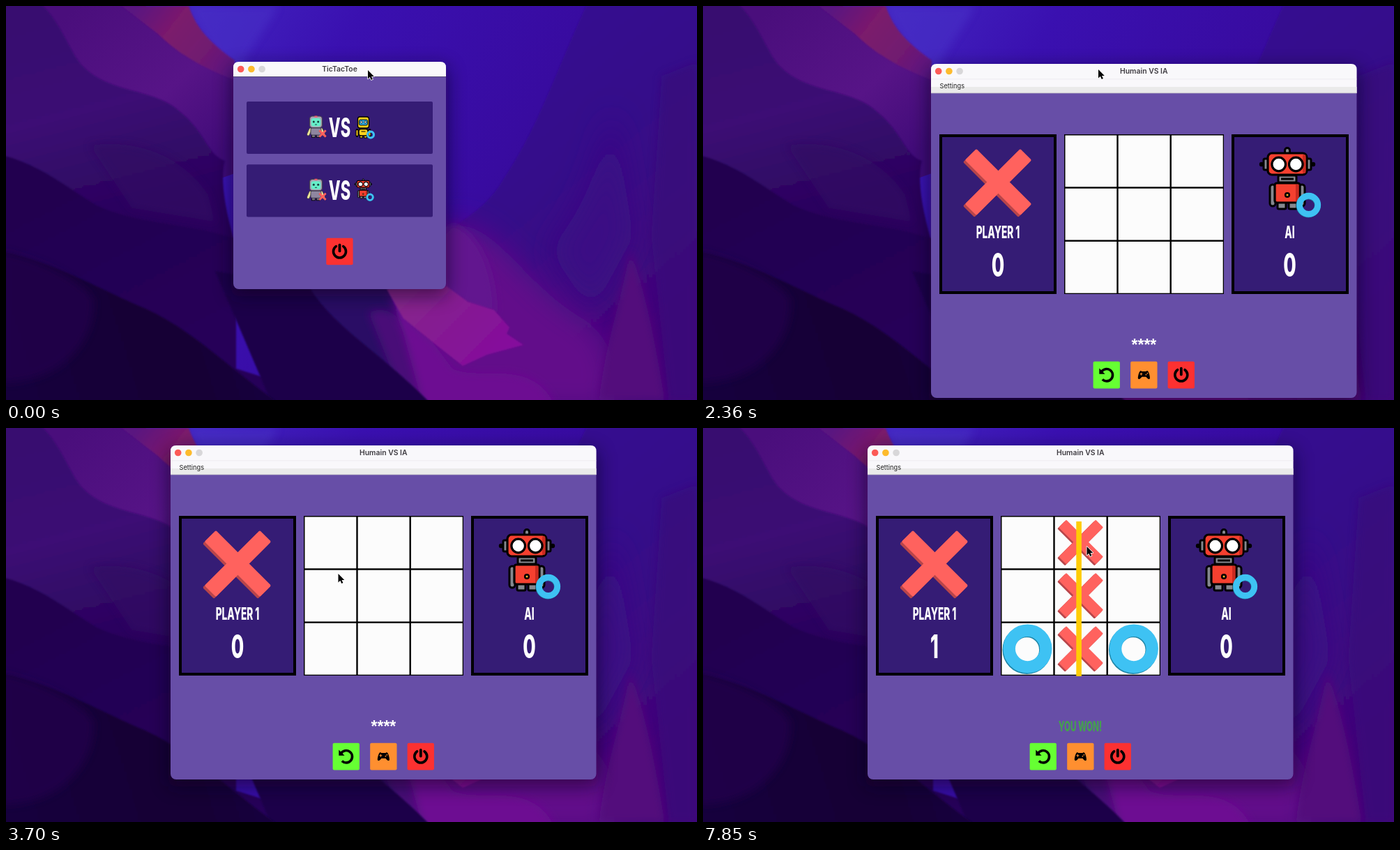
These frames come from a looping animation (991x565 px, 8000 ms). An HTML page:

```html
<!DOCTYPE html>
<html lang="en">
<head>
<meta charset="utf-8">
<title>TicTacToe</title>
<style>
html, body { margin: 0; width: 100%; height: 100%; overflow: hidden; background: #210450; }
svg { display: block; width: 991px; height: 565px; }
text { font-family: Inter, Roboto, sans-serif; }
.title { font-size: 10.4px; font-weight: 600; fill: #3f3c42; text-anchor: middle; }
.menu { font-size: 9.2px; fill: #222; }
.cond { font-weight: 800; fill: #fff; text-anchor: middle; }
.stars { font: bold 23px "Liberation Sans", Arial, sans-serif; fill: #fff; text-anchor: middle; }
</style>
</head>
<body>
<svg id="stage" viewBox="0 0 991 565" xmlns="http://www.w3.org/2000/svg">
<defs>
  <linearGradient id="sky" gradientUnits="userSpaceOnUse" x1="280" y1="0" x2="960" y2="420">
    <stop offset="0" stop-color="#4224c0"/><stop offset=".25" stop-color="#3a10b0"/>
    <stop offset=".6" stop-color="#380ba0"/><stop offset="1" stop-color="#350880"/>
  </linearGradient>
  <linearGradient id="fold" x1="0" y1="0" x2=".5" y2="1">
    <stop offset="0" stop-color="#350c94"/><stop offset=".5" stop-color="#35098a"/>
    <stop offset="1" stop-color="#430678"/>
  </linearGradient>
  <linearGradient id="plum" gradientUnits="userSpaceOnUse" x1="100" y1="0" x2="300" y2="220">
    <stop offset="0" stop-color="#4a0e7c"/><stop offset=".6" stop-color="#571487"/>
    <stop offset="1" stop-color="#400b78"/>
  </linearGradient>
  <linearGradient id="crimson" gradientUnits="userSpaceOnUse" x1="190" y1="0" x2="320" y2="100">
    <stop offset="0" stop-color="#5a1280"/><stop offset=".35" stop-color="#7b1a6c"/>
    <stop offset=".7" stop-color="#711a70"/><stop offset="1" stop-color="#5c1684"/>
  </linearGradient>
  <linearGradient id="hill" gradientUnits="userSpaceOnUse" x1="60" y1="0" x2="140" y2="310">
    <stop offset="0" stop-color="#370a70"/><stop offset=".5" stop-color="#3c0a74"/>
    <stop offset="1" stop-color="#29055c"/>
  </linearGradient>
  <linearGradient id="deep" gradientUnits="userSpaceOnUse" x1="60" y1="230" x2="200" y2="500">
    <stop offset="0" stop-color="#22044f"/><stop offset="1" stop-color="#260658"/>
  </linearGradient>
  <linearGradient id="floor" gradientUnits="userSpaceOnUse" x1="40" y1="560" x2="460" y2="430">
    <stop offset="0" stop-color="#19033c"/><stop offset=".5" stop-color="#150234"/>
    <stop offset="1" stop-color="#1d0548"/>
  </linearGradient>
  <linearGradient id="rose" gradientUnits="userSpaceOnUse" x1="590" y1="400" x2="700" y2="510">
    <stop offset="0" stop-color="#86268c"/><stop offset="1" stop-color="#850c9c"/>
  </linearGradient>
  <filter id="b1" x="-10%" y="-10%" width="120%" height="120%"><feGaussianBlur stdDeviation="1"/></filter>
  <filter id="b6" x="-20%" y="-20%" width="140%" height="140%"><feGaussianBlur stdDeviation="6"/></filter>
  <filter id="b20" x="-40%" y="-40%" width="180%" height="180%"><feGaussianBlur stdDeviation="20"/></filter>
  <filter id="shade" x="-20%" y="-20%" width="140%" height="150%"><feGaussianBlur stdDeviation="13"/></filter>
</defs>

<g id="wallpaper">
  <rect width="991" height="565" fill="url(#sky)"/>
  <path d="M262 0H390C370 40 345 60 330 110L295 60Z" fill="#4a30c8" opacity=".55" filter="url(#b6)"/>
  <path d="M832 0C790 90 765 170 716 244C690 290 662 300 640 320L700 565H991V0Z" fill="url(#fold)" filter="url(#b1)"/>
  <path d="M870 150C850 230 830 290 780 350L840 440L900 330Z" fill="#3a0a84" filter="url(#b20)"/>
  <path d="M940 100L925 330L950 565H991V80Z" fill="#39077a" opacity=".7" filter="url(#b6)"/>
  <path d="M630 315C700 300 740 400 830 450C870 480 880 520 870 580H580L540 400Z" fill="#620b8a" filter="url(#b20)"/>
  <path d="M895 350C915 400 930 470 945 565H850C860 480 880 430 895 350Z" fill="#52077c" filter="url(#b6)"/>
  <path d="M640 312C675 325 700 370 702 440L640 420L560 406Z" fill="#62178f" filter="url(#b6)"/>
  <path d="M400 400H546C556 430 590 500 607 565H380Z" fill="#2a0765" filter="url(#b1)"/>
  <path d="M520 440C560 420 590 470 612 565H570Z" fill="#480a78" filter="url(#b6)"/>
  <path d="M546 405C560 430 585 462 610 480L640 520C680 540 760 500 790 580H600L570 470Z" fill="#6d0c92" filter="url(#b6)"/>
  <path d="M546 406L632 402L662 424L700 436L722 461L718 470L742 486L690 500L655 516L612 482L570 448Z" fill="url(#rose)" filter="url(#b1)"/>

  <path d="M40 0H200L328 98V240L300 250L100 150Z" fill="url(#plum)"/>
  <path d="M166 0H262C272 28 286 48 328 78V106C290 92 250 72 218 40Z" fill="url(#crimson)" filter="url(#b1)"/>
  <path d="M-5 -5H48C82 26 92 70 112 88C150 126 215 118 250 152C285 180 290 215 314 222C306 250 316 300 330 345L0 330Z" fill="url(#hill)" filter="url(#b1)"/>
  <path d="M120 200C180 190 250 210 290 270L300 310L180 290Z" fill="#300764" opacity=".7" filter="url(#b6)"/>
  <path d="M-5 214C50 228 90 262 130 286C190 314 260 310 330 334V520L520 580H-5Z" fill="url(#deep)" filter="url(#b1)"/>
  <path d="M300 380L436 405C470 460 540 500 606 567H380Z" fill="#1d0549" filter="url(#b1)"/>
  <path d="M-5 352C70 368 130 404 200 434C270 466 320 520 392 570H-5Z" fill="url(#floor)" filter="url(#b1)"/>
  <path d="M-5 352C60 366 110 396 125 420C130 480 80 540 -5 540Z" fill="#20044c" opacity=".8" filter="url(#b6)"/>
</g>
<g id="menu"></g>
<g id="game"></g>
<path id="cursor" d="M0 0V12.4L2.8 9.8L4.8 14L6.9 13L5 9H8.8Z" stroke="#fff" stroke-width="1.6" stroke-linejoin="round" paint-order="stroke"/>
</svg>

<script>
const $ = id => document.getElementById(id);
const BODY = '#674ea7', DARK = '#351c75', RED = '#fc3131';

const at = (x, y, s, body) => `<g transform="translate(${x} ${y}) scale(${s})">${body}</g>`;
const rect = (x, y, w, h, fill, more = '') =>
  `<rect x="${x}" y="${y}" width="${w}" height="${h}" fill="${fill}" ${more}/>`;
const dot = (x, y, r, fill, more = '') => `<circle cx="${x}" cy="${y}" r="${r}" fill="${fill}" ${more}/>`;
const line = (d, color, w, more = '') =>
  `<path d="${d}" fill="none" stroke="${color}" stroke-width="${w}" ${more}/>`;
const ink = w => `stroke="#000" stroke-width="${w}"`;

// one condensed display face for all headings
const cond = (x, y, size, str, more = '') =>
  `<text class="cond" transform="translate(${x} ${y}) scale(.57 1)" font-size="${size}" ${more}>${str}</text>`;

function cross(x, y, s) {
  const arms = (dx, dy, c) => [45, -45].map(a =>
    rect(-56, -11.5, 112, 23, c, `rx="2" transform="translate(${dx} ${dy}) rotate(${a})"`)).join('');
  return at(x, y, s, arms(-1.8, 1.8, '#b8454a') + arms(1, -1, '#ff625e'));
}

function ring(x, y, s) {
  const loop = (dx, dy, c) => dot(dx, dy, 26.3, 'none', `stroke="${c}" stroke-width="17.4"`);
  return at(x, y, s, loop(-.7, .9, '#1f86a8') + loop(.3, -.4, '#3ec2f3'));
}

function redRobot(x, y, s) {
  const grey = '#85888f';
  const arm = rect(-25, 54, 8, 31, grey, 'rx="4" ' + ink(3));
  const ear = rect(-34, 17, 7, 16, grey, 'rx="2" ' + ink(3)) + dot(-37, 25, 3.2, '#000');
  const flip = g => g + `<g transform="scale(-1 1)">${g}</g>`;
  return at(x, y, s,
    rect(-3.5, 1.5, 7, 10, grey, 'rx="3.5" ' + ink(3)) + flip(ear) + flip(arm) +
    rect(-13, 41, 26, 10, grey, 'rx="2" ' + ink(3)) + line('M-9 46H9', '#000', 3) +
    rect(-14, 78, 12, 11, grey, 'rx="2" ' + ink(3)) + rect(2, 78, 12, 11, grey, 'rx="2" ' + ink(3)) +
    rect(-28, 9, 56, 31, '#f5402f', 'rx="6" ' + ink(3.2)) + rect(22, 11, 4.5, 27, '#c92a20', 'rx="2"') +
    dot(-12.3, 25, 9.8, '#fff', ink(3.2)) + dot(12.3, 25, 9.8, '#fff', ink(3.2)) +
    rect(-18, 52, 36, 28, '#f5402f', 'rx="3" ' + ink(3.2)) + rect(12, 54, 4.5, 24, '#c92a20') +
    dot(0, 69, 2.8, '#ffb52e', ink(2.6)) + ring(30.5, 83.5, .5));
}

function yellowRobot(x, y) {
  return at(x, y, 1,
    line('M-9 20V28M9 20V28', '#000', 4, 'stroke-linecap="round"') +
    line('M-9 21V27M9 21V27', '#f5c518', 2, 'stroke-linecap="round"') +
    rect(-5, 27, 4, 4, '#f5c518', ink(1)) + rect(1, 27, 4, 4, '#f5c518', ink(1)) +
    rect(-8, 1, 16, 16, '#ffd31c', 'rx="3" ' + ink(1.4)) + rect(-6, 5, 12, 8, '#2fa9dc', 'rx="2" ' + ink(.9)) +
    dot(-2.8, 8.5, 1.5, '#fff', ink(.8)) + dot(2.8, 8.5, 1.5, '#fff', ink(.8)) +
    rect(-6.5, 18.5, 13, 9.5, '#ffd31c', 'rx="3" ' + ink(1.4)) + line('M-3 22H3', '#000', 1) +
    ring(10.5, 26.5, .17));
}

function mintRobot(x, y) {
  return at(x, y, 1,
    line('M-8 20L-11 27M8 20L11 27', '#4a4550', 4.6, 'stroke-linecap="round"') +
    line('M-8 20L-11 27M8 20L11 27', '#efe79a', 3, 'stroke-linecap="round"') +
    rect(-6, 26, 5, 5.5, '#77717f', ink(.8)) + rect(1, 26, 5, 5.5, '#77717f', ink(.8)) +
    rect(-9, 1, 18, 16.5, '#a9a4b4', 'rx="4" stroke="#454050" stroke-width="1.2"') +
    rect(-6.8, 4, 13.6, 11.5, '#66efc9', 'rx="3"') + line('M-2 1.5H2', '#f0566a', 2) +
    dot(-3.2, 9, 1.5, '#173d3c') + dot(3.2, 9, 1.5, '#173d3c') + line('M-1.5 13H1.5', '#173d3c', 1) +
    rect(-7.5, 18, 15, 10, '#8f86a0', 'rx="2" stroke="#454050" stroke-width="1"') +
    cross(9.5, 26, .115));
}

const icons = {
  power: line('M-5.2 -7.4A9 9 0 1 0 5.2 -7.4', '#000', 3.6, 'stroke-linecap="round"') +
    line('M0 -9.4V-.6', '#000', 3.8, 'stroke-linecap="round"'),
  redo: line('M-7.4 -4.4A8.7 8.7 0 1 1 -6 6.4', '#000', 3.6) + '<path d="M-10.5 -9.6V-1.4H-2.2Z"/>',
  pad: '<path d="M-4.5 -6C-7 -6 -9 3 -8.5 5C-8 7 -5.5 6 -3 2.6H3C5.5 6 8 7 8.5 5C9 3 7 -6 4.5 -6L3 -5H-3Z"/>' +
    line('M-6 -1.4H-2M-4 -3.4V.6', '#ff8f30', 1.1) + dot(3, -.4, .9, '#ff8f30') + dot(5, -2.4, .9, '#ff8f30')
};
const button = (x, y, fill, icon) => rect(x, y, 38.3, 38.6, fill, 'rx="2"') + at(x + 19.2, y + 19.3, 1, icons[icon]);

const lights = ['#fc5b57', '#fdbb2d', '#d8d7d9'].map((c, i) => dot(10.7 + 15.2 * i, 10.5, 4.8, c)).join('');

function frame(w, h, title, bar) {
  return rect(-3, 6, w + 6, h + 4, '#08001c', 'rx="10" opacity=".55" filter="url(#shade)"') +
    rect(0, 0, w, h, BODY, 'rx="8"') +
    `<path d="M0 ${bar}V8Q0 0 8 0H${w - 8}Q${w} 0 ${w} 8V${bar}Z" fill="#f9f8fb"/>` +
    lights + `<text class="title" x="${w / 2}" y="14.2">${title}</text>`;
}

// start menu
const versus = (y, rival) => mintRobot(118.5, y + 20) + cond(152.5, y + 50.5, 38.5, 'VS') + rival;
$('menu').innerHTML = frame(305, 326, 'TicTacToe', 21.5) + rect(0, 21, 305, .8, '#3c3060') +
  rect(19, 57, 267, 75, DARK, 'id="pick0" rx="2"') + versus(57, yellowRobot(186.5, 78)) +
  rect(19, 147.3, 267, 75.2, DARK, 'id="pick1" rx="2"') + versus(147.3, redRobot(186.3, 167.5, .32)) +
  button(133.3, 252.7, RED, 'power');

// game window
const cell = i => 38.2 + 76.2 * i;
const cells = [0, 1, 2].map(r => [0, 1, 2].map(c =>
  rect(192.5 + 76.2 * c, 102.5 + 76.2 * r, 73.8, 73.8, '#fcfcfc')).join('')).join('');
const panel = x => rect(x + 2, 103, 164, 225, DARK, ink(4));
const mark = (id, kind, c, r) => `<g id="${id}">` +
  (kind === 'x' ? cross(191 + cell(c), 101 + cell(r), .67) : ring(191 + cell(c), 101.4 + cell(r), 1)) + '</g>';

$('game').innerHTML = frame(610.5, 479, 'Humain VS IA', 42) +
  rect(0, 21.5, 610.5, .8, '#ebe9ee') + rect(0, 33, 610.5, 9, '#eaeaea') + rect(0, 41.5, 610.5, .8, '#b9b5c4') +
  '<text class="menu" x="12.6" y="35.3">Settings</text>' +
  panel(12) + panel(431) + cross(95.5, 170.5, 1) + redRobot(511, 119, 1) +
  cond(96, 249.5, 24, 'PLAYER 1') + cond(514.5, 249.5, 24, 'AI') +
  cond(96, 305, 47, '0', 'id="score"') + cond(514.5, 305, 47, '0') +
  rect(191, 101, 229, 229, '#000') + cells +
  mark('x0', 'x', 1, 1) + mark('o0', 'o', 0, 2) + mark('x1', 'x', 1, 2) + mark('o1', 'o', 2, 2) + mark('x2', 'x', 1, 0) +
  rect(299.3, 109, 7.6, 222, '#ffcc05', 'id="strike"') +
  '<text class="stars" id="stars" x="305.4" y="410.8">****</text>' +
  cond(305, 409.5, 20.5, 'YOU WON!', 'id="won" style="fill:#45a04f"') +
  button(232.6, 426.8, '#66ff33', 'redo') + button(286.2, 426.8, '#ff8f30', 'pad') + button(339.6, 426.8, RED, 'power');

// the picture holds between steps: [first, last, count]
const runs = [[0, 0, 1], [150, 150, 1], [440, 1180, 6], [1480, 1480, 1], [1780, 2360, 5], [2660, 3700, 8],
  [3850, 4880, 8], [5180, 6210, 8], [6360, 6510, 2], [6810, 7850, 8]];

function snap(t) {
  const [a, b, n] = runs.filter(r => r[0] <= t).pop();
  if (n === 1) return a;
  const step = (b - a) / (n - 1);
  return a + step * Math.min(n - 1, Math.floor((t - a + 6) / step));
}

// keys: [time, x, y]
const pointer = [[0, 519, 92], [150, 520, 95], [300, 520, 95], [740, 509, 200], [1030, 498, 268], [1180, 497, 273],
  [1630, 497, 273], [2210, 564, 98], [2360, 567, 91], [2510, 567, 91], [2660, 534.5, 75], [2810, 500, 49.5],
  [2960, 487, 40], [3250, 486, 39], [3550, 478, 185], [3700, 476.5, 209], [3850, 480, 213], [4290, 533, 240],
  [4880, 531, 235], [5030, 531, 235], [6060, 562.5, 303], [6660, 563, 304], [7250, 551, 172], [7850, 550.5, 170]];
const drag = [[0, 327, 83], [2510, 327, 83], [2660, 295, 67], [2810, 253, 38], [2960, 238, 27], [3100, 236, 25]];

function pos(keys, t) {
  const i = keys.findIndex(k => k[0] > t);
  if (i < 0) return keys[keys.length - 1].slice(1);
  const [t0, x0, y0] = keys[i - 1], [t1, x1, y1] = keys[i], p = (t - t0) / (t1 - t0);
  return [x0 + (x1 - x0) * p, y0 + (y1 - y0) * p];
}

const show = (id, on) => $(id).style.display = on ? '' : 'none';
const move = (id, x, y) => $(id).setAttribute('transform', `translate(${x} ${y})`);
const shownAt = { x0: 4435, o0: 4580, x1: 6360, o1: 6510, x2: 7395, strike: 7395, won: 7395 };

function draw(time) {
  const t = snap(time), [x, y] = pos(pointer, t), won = t >= shownAt.won;
  const playing = t >= 1480;
  show('menu', !playing);
  show('game', playing);
  move('menu', t < 150 ? 326 : 327, t < 150 ? 80 : 83);
  move('game', ...pos(drag, t));
  move('cursor', x, y);
  $('pick0').setAttribute('fill', y > 140 && y < 215 ? '#43288a' : DARK);
  $('pick1').setAttribute('fill', y > 230 && y < 306 ? '#43288a' : DARK);
  for (const id in shownAt) show(id, t >= shownAt[id]);
  show('stars', !won);
  $('score').textContent = won ? '1' : '0';
}

function tick() {
  draw(performance.now() % 8000);
  requestAnimationFrame(tick);
}
tick();
</script>
</body>
</html>
```
